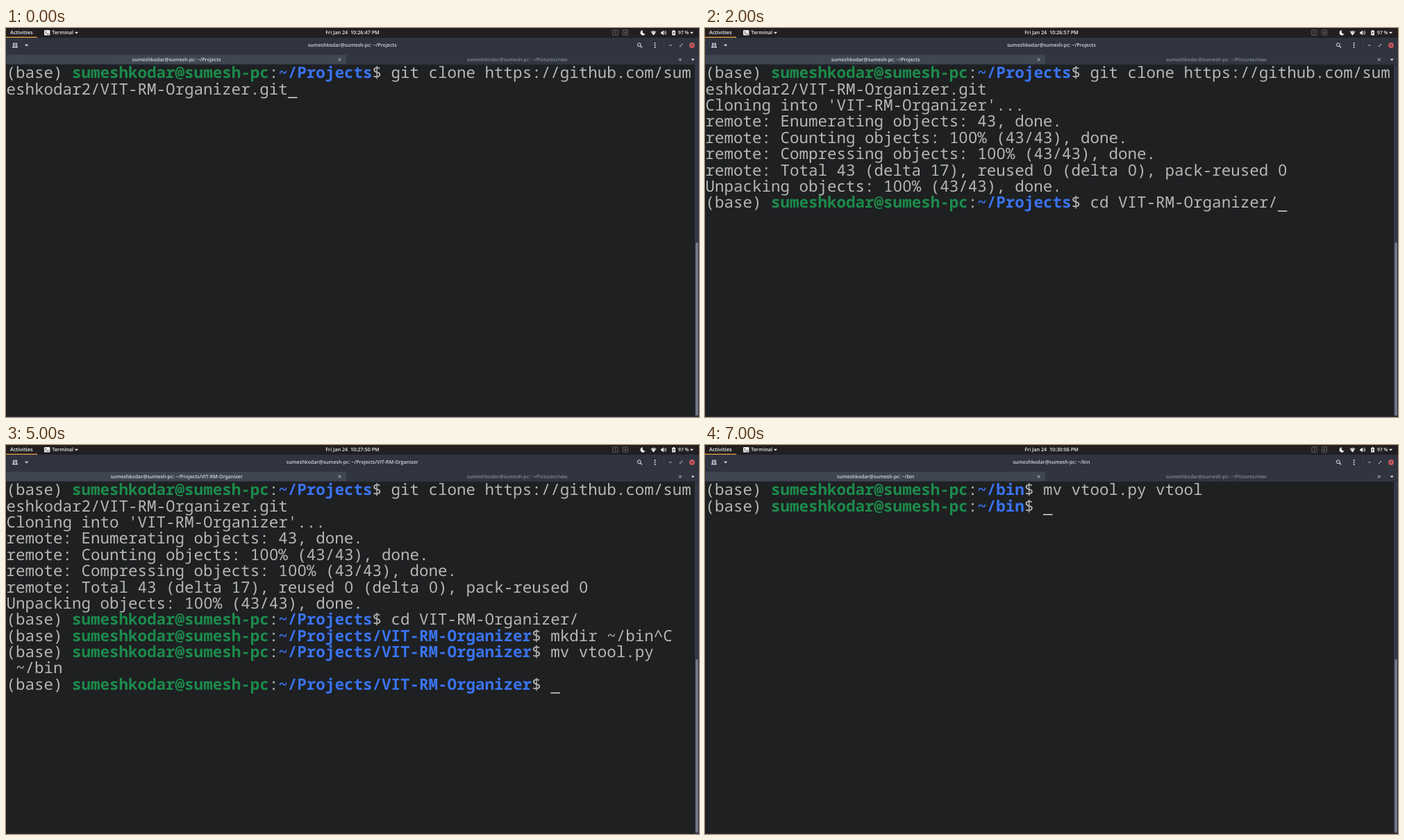
An HTML page for the animation above (8000 ms loop, 998 by 561 pixels).

```html
<!DOCTYPE html>
<html lang="en">
<head>
<meta charset="utf-8">
<title>Terminal session</title>
<style>
  html, body { margin: 0; width: 100%; height: 100%; overflow: hidden; background: #1e2022; }
  svg { display: block; width: 998px; height: 561px; }
  text { white-space: pre; text-rendering: geometricPrecision; }
  .ui { font: 600 7.08px "Open Sans", "Noto Sans", sans-serif; fill: #d6d9df; }
  .bar { font-size: 7.25px; fill: #f0f0f0; }
  .mid { text-anchor: middle; }
  .term { font: 22.525px "Noto Sans Mono", "DejaVu Sans Mono", monospace; }
  .zero { font-family: "Noto Sans", "Open Sans", sans-serif; text-anchor: middle; }
  .line { fill: none; stroke: #e4e6ea; stroke-width: 1; }
</style>
</head>
<body>
<svg viewBox="0 0 998 561" xmlns="http://www.w3.org/2000/svg">
  <rect width="998" height="561" fill="#1e2022"/>

  <!-- top bar -->
  <rect width="998" height="14" fill="#231f21"/>
  <rect y="12.7" width="45" height="1.4" fill="#e5a046"/>
  <text class="ui bar" x="6" y="9.3" style="font-size:7.45px">Activities</text>
  <rect x="55" y="3" width="8.4" height="7.6" rx="1.2" fill="#ececec"/>
  <path d="M56.6 4.8l1.7 1.6-1.7 1.6M59 8.6h2.6" class="line" style="stroke:#231f21;stroke-width:.9"/>
  <text class="ui bar" x="66.3" y="9.3">Terminal</text>
  <path d="M98.9 5.8h5.2l-2.6 2.7z" fill="#eee"/>
  <text class="ui bar mid" id="clock" x="499" y="9.2"></text>
  <g fill="none" stroke="#77757a" stroke-width=".8">
    <rect x="873.9" y="2.9" width="7.2" height="7.4" rx=".8"/>
    <rect x="888.4" y="2.9" width="7.2" height="7.4" rx=".8"/>
    <path d="M876.6 5.3l1-.6v3.8M890.6 8.6l1.4-3.9 1.4 3.9M891.1 7.3h1.8"/>
  </g>
  <path d="M917 3.2a3.7 3.7 0 1 0 3.6 5.3a3.7 3.7 0 0 1-3.6-5.3z" fill="#eee"/>
  <path d="M928.3 5.2q4.2-3 8.4 0l-4.2 5.4z" fill="#aaa8aa"/>
  <path d="M929.8 7.1q2.7-1.6 5.4 0l-2.7 3.5z" fill="#f2f2f2"/>
  <path d="M943.2 5.4h1.6l2.3-2.1v7.2l-2.3-2.1h-1.6z" fill="#eee"/>
  <path d="M948.3 5q1.3 1.9 0 3.8M949.6 3.8q2.2 3.1 0 6.2" class="line" style="stroke-width:.8"/>
  <path d="M959.2 4h1.4v-.9h2V4h1.4v6.6h-4.8z" fill="#eee"/>
  <path d="M962 4.9l-1.7 2.6h1.3l-.4 2 1.8-2.8h-1.3z" fill="#231f21"/>
  <text class="ui bar" x="968" y="9.2" style="font-size:6.8px">97 %</text>
  <path d="M984.9 5.8h5.2l-2.6 2.7z" fill="#eee"/>

  <!-- window header -->
  <rect y="14" width="998" height="24" fill="#2f343f"/>
  <path d="M10.6 27.4v-5.2h4.9v5.2M9 27.6h8" class="line" style="stroke-width:1.1"/>
  <path d="M13.05 23.4v2.8M11.65 24.8h2.8" class="line" style="stroke-width:.8"/>
  <path d="M27 23.8h5.2l-2.6 2.7z" fill="#dfe2e7"/>
  <text class="ui mid" id="title" x="498.8" y="27.2"></text>
  <circle cx="911.8" cy="24.2" r="2.4" class="line"/>
  <path d="M913.6 26l2.4 2.4" class="line" style="stroke-width:1.3"/>
  <g fill="#e4e6ea">
    <circle cx="934.6" cy="22" r="1"/><circle cx="934.6" cy="25" r="1"/><circle cx="934.6" cy="28" r="1"/>
  </g>
  <path d="M947.5 20v10" stroke="#424854" stroke-width=".8"/>
  <path d="M955.2 25h3.4" class="line" style="stroke:#c0c4cc"/>
  <path d="M970.6 26.6l3-3M972.2 23.4h1.6v1.6M970.4 25.2v1.6h1.6" class="line" style="stroke:#c0c4cc;stroke-width:.7"/>
  <circle cx="988" cy="25" r="3.9" fill="#cc575d"/>
  <path d="M986.6 23.6l2.8 2.8m0-2.8l-2.8 2.8" class="line" style="stroke:#2f343f;stroke-width:.8"/>

  <!-- tabs -->
  <rect y="38" width="998" height="15" fill="#303541"/>
  <rect x="1" y="38.6" width="489" height="13.4" fill="#404552"/>
  <rect y="52.2" width="998" height="1" fill="#292d37"/>
  <text class="ui mid" id="tab" x="245.7" y="47.8"></text>
  <text class="ui mid" x="736.2" y="47.8" style="fill:#858a95">sumeshkodar@sumesh-pc: ~/Pictures/new</text>
  <path d="M478.7 43.7l3.8 3.8m0-3.8l-3.8 3.8M968.9 43.7l3.8 3.8m0-3.8l-3.8 3.8" class="line" style="stroke:#c9ccd3"/>
  <path d="M986.5 44.5h5.2l-2.6 2.7z" fill="#dfe2e7"/>

  <!-- terminal -->
  <g id="screen" class="term"></g>
  <rect x="992" y="53" width="6" height="508" fill="#353945"/>
  <rect x="993.2" y="309" width="3.6" height="250" rx="1.8" fill="#767b87"/>
  <rect y="560" width="998" height="1" fill="#2b2f38"/>
</svg>
<script>
const CELL = 13.515, ROW = 23.38, LEFT = 0.4, TOP = 53.2;
const GREY = '#b6b7b5', GREEN = '#1c8b4b', BLUE = '#3a73f0';
const WHO = 'sumeshkodar@sumesh-pc', HOME = '~/Projects', REPO = HOME + '/VIT-RM-Organizer';
const $ = id => document.getElementById(id);

// A line is a list of runs: [text, colour, bold]
const plain = s => [[s, GREY]];
const prompt = (path, cmd = '') => [
  ['(base) ', GREY], [WHO, GREEN, true], [':', GREY], [path, BLUE, true], ['$ ' + cmd, GREY]
];

const clone = [prompt(HOME, 'git clone https://github.com/sum'), plain('eshkodar2/VIT-RM-Organizer.git')];
const cloned = [...clone, ...[
  "Cloning into 'VIT-RM-Organizer'...",
  'remote: Enumerating objects: 43, done.',
  'remote: Counting objects: 100% (43/43), done.',
  'remote: Compressing objects: 100% (43/43), done.',
  'remote: Total 43 (delta 17), reused 0 (delta 0), pack-reused 0',
  'Unpacking objects: 100% (43/43), done.'
].map(plain)];
const entered = [...cloned, prompt(HOME, 'cd VIT-RM-Organizer/')];
const moved = [...entered, prompt(REPO, 'mkdir ~/bin^C'), prompt(REPO, 'mv vtool.py'), plain(' ~/bin')];

const steps = [
  ['10:26:47', HOME, clone],
  ['10:26:52', HOME, [...cloned, prompt(HOME)]],
  ['10:26:57', HOME, entered],
  ['10:27:02', REPO, [...entered, prompt(REPO)]],
  ['10:27:15', REPO, [...entered, prompt(REPO, 'mkdir ~/bin')]],
  ['10:27:50', REPO, [...moved, prompt(REPO)]],
  ['10:28:20', '~/bin', [...moved, prompt(REPO, 'cd ~/bin'), prompt('~/bin')]],
  ['10:30:06', '~/bin', [prompt('~/bin', 'mv vtool.py vtool'), prompt('~/bin')]]
];

const colX = col => LEFT + col * CELL;

function drawLine(runs, row) {
  const y = TOP + row * ROW + 19.1;
  let col = 0, out = '';
  for (const [text, fill, bold] of runs) {
    // zeros use an open glyph, centred in their cell
    for (const part of text.match(/0|[^0]+/g)) {
      const zero = part === '0';
      const x = colX(col + (zero ? 0.5 : 0));
      out += `<text x="${x}" y="${y}" fill="${fill}"${bold ? ' font-weight="700"' : ''}` +
        `${zero ? ' class="zero"' : ''}>${part}</text>`;
      col += part.length;
    }
  }
  return { out, col };
}

function draw([time, path, lines]) {
  const drawn = lines.map(drawLine);
  const x = colX(drawn[drawn.length - 1].col), y = TOP + lines.length * ROW - 0.3;
  $('screen').innerHTML = drawn.map(d => d.out).join('') +
    `<rect x="${x}" y="${y}" width="${CELL}" height="1.4" fill="#e8e8e8"/>`;
  $('clock').textContent = `Fri Jan 24  ${time} PM`;
  $('title').textContent = $('tab').textContent = `${WHO}: ${path}`;
}

let shown = -1;
function tick() {
  const i = Math.floor(performance.now() % 8000 / 1000);
  if (i !== shown) draw(steps[shown = i]);
  requestAnimationFrame(tick);
}
tick();
</script>
</body>
</html>
```
